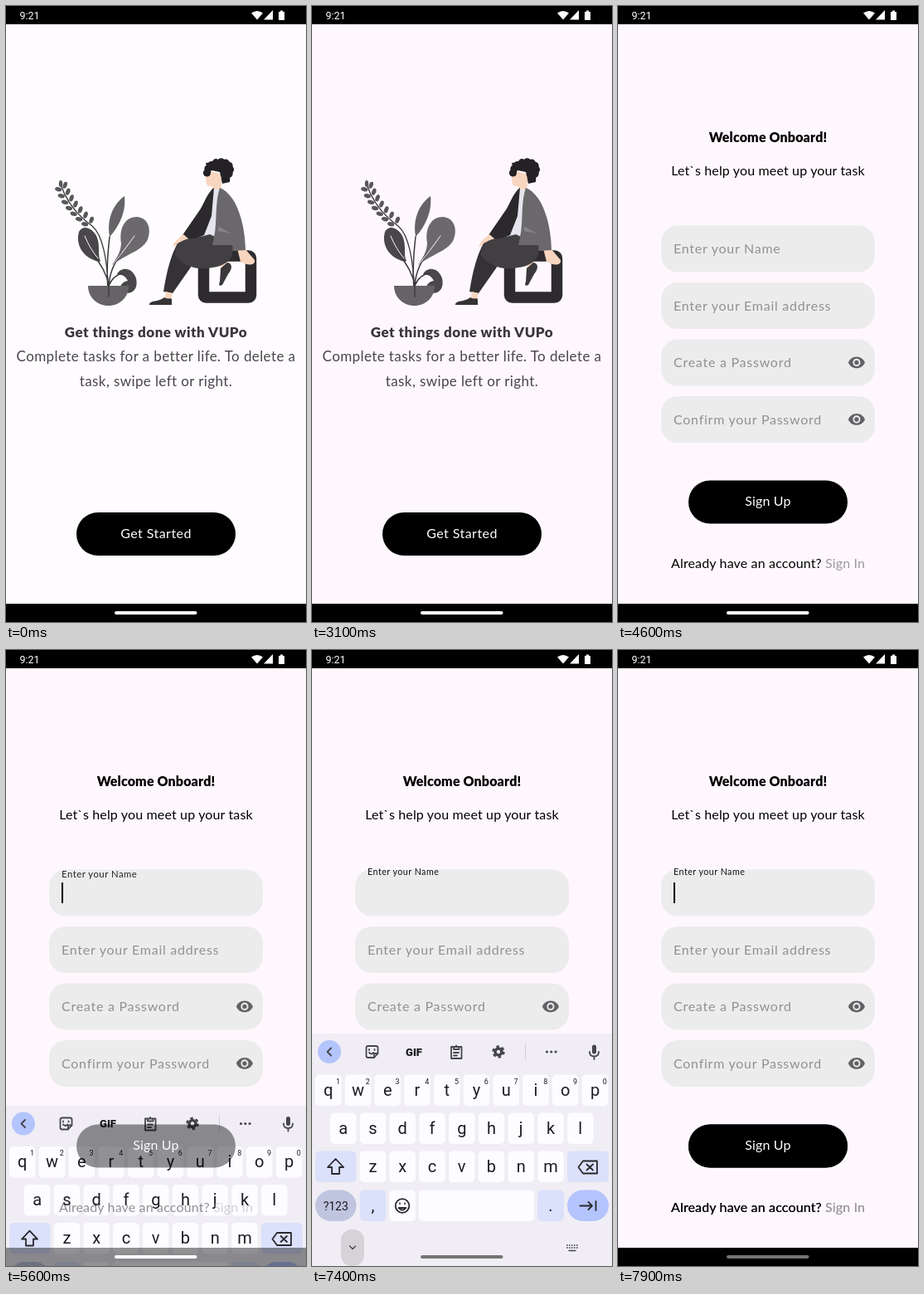
An HTML page that plays this animation: 362 px wide and 742 px high, repeating every 8000 ms.

```html
<!DOCTYPE html>
<html lang="en">
<head>
<meta charset="utf-8">
<title>Task app onboarding</title>
<style>
  html, body { margin: 0; width: 100%; height: 100%; overflow: hidden; background: #fef8fe; }
  svg { display: block; width: 100%; height: 100%; }
  text { font-family: Lato, sans-serif; font-size: 16px; letter-spacing: .15px; }
  .mid { text-anchor: middle; }
  .body { font-size: 17px; letter-spacing: .4px; fill: #49454b; }
  .hint { letter-spacing: .75px; fill: #929093; }
  .heavy { font-weight: 900; }
  .roboto, .keys text { font-family: Roboto, sans-serif; letter-spacing: 0; }
  .keys text { text-anchor: middle; fill: #1d1c21; }
  .line { fill: none; stroke: #46454b; stroke-width: 1.8; stroke-linecap: round; stroke-linejoin: round; }
</style>
</head>
<body>
<svg viewBox="0 0 362 742">
  <defs>
    <path id="eye" fill="#636165" fill-rule="evenodd" transform="scale(.91)" d="M12 4.5C7 4.5 2.73 7.61 1 12c1.73 4.39 6 7.5 11 7.5s9.27-3.11 11-7.5c-1.73-4.39-6-7.5-11-7.5zM12 17c-2.76 0-5-2.24-5-5s2.24-5 5-5 5 2.24 5 5-2.24 5-5 5zm0-8c-1.66 0-3 1.34-3 3s1.34 3 3 3 3-1.34 3-3-1.34-3-3-3z"/>
  </defs>
  <rect id="page" width="362" height="742" fill="#fef8fe"/>

  <g id="welcome">
    <g id="plant">
      <path fill="#656366" d="M125 278C121 256 130 238 143 229C145 246 138 264 125 278Z"/>
      <path fill="#6b696c" d="M128 312C133 303 138 299 139 286C136 267 144 254 158 254C171 255 176 268 171 281C165 295 146 298 128 312Z"/>
      <path fill="#49474a" d="M112 308C91 303 84 286 88 272C93 262 106 268 110 279C114 291 110 300 114 307Z"/>
      <path fill="#49474a" d="M134 323C139 313 153 315 157 328C160 341 152 348 143 345C134 341 139 332 147 331C144 325 139 323 134 323Z"/>
      <path class="line" style="stroke:#3c3a3d;stroke-width:1.3" d="M66 215Q76 245 104 265Q122 280 124 350"/>
      <path class="line" style="stroke:#3c3a3d;stroke-width:1.5" d="M124 350Q120 320 125 278M124 340Q124 318 139 298M124 337Q121 318 104 298M124 337Q130 323 142 322"/>
      <path class="line" style="stroke:#fef8fe;stroke-width:1" d="M130 310Q143 294 155 277M111 304Q101 292 95 277"/>
      <path fill="#656366" d="M99 337H148C148 351 137 361 123.500 361S99 351 99 337Z"/>
      <path class="line" style="stroke:#39373a;stroke-width:1.3" d="M124 350V337"/>
    </g>
    <g id="person">
      <rect x="238.500" y="301" width="57" height="50" rx="3" fill="none" stroke="#2d2b2e" stroke-width="13.500"/>
      <path fill="#f8d5be" d="M260 307L270 309L267 318L259 316Z"/>
      <path fill="#3b393c" d="M267 309C274 310 273 317 268 323L261 336C258 338 256 336 258 332L259 316Z"/>
      <path fill="#f8d5be" d="M279 292L288 292L300 306C301 312 294 312 290 311L283 308Z"/>
      <path fill="#f8d5be" d="M243 198C240 207 241 215 244 217H249L248 224L259 224L261 203Z"/>
      <path fill="#e4e4ec" d="M249 220L260 221L259 285H237Z"/>
      <path fill="#6a686b" d="M258 219C276 226 288 256 289 294L274 295L272 288H249C256 264 251 240 258 219Z"/>
      <path fill="#2b292c" d="M251 219L248 253L239 276L221 284L213 276L235 244C241 233 244 224 251 219Z"/>
      <path fill="#f8d5be" d="M214 275L221 281L210 287L201 290Q202 286 206 282Z"/>
      <path fill="#343235" d="M207 286C222 276 239 288 229 306L201 346L190 344Q196 305 207 286Z"/>
      <path fill="#413f42" d="M204 300C204 287 213 279 227 280L246 275L273 288C277 303 266 313 249 315C230 319 213 313 204 300Z"/>
      <path fill="#6a686b" d="M252 274L273 276V288H249Z"/>
      <path fill="#858386" d="M256 265L271 274L256 271Z"/>
      <path fill="#f8d5be" d="M193 344L201 346L199 354H191Z"/>
      <path fill="#353336" d="M191 351C196 354 199 351 200 353V360H173C173 354 184 357 191 351Z"/>
      <g id="hair" fill="#242225">
        <path d="M241 189L262 187L271 196L270 212L261 214L258 200L243 197Z"/>
      </g>
      <ellipse cx="257" cy="207" rx="2.500" ry="3.500" fill="#f8d5be"/>
    </g>
    <text class="mid body heavy" x="181" y="399" style="letter-spacing:.5px;fill:#3b363d">Get things done with VUPo</text>
    <text class="mid body" x="181" y="428">Complete tasks for a better life. To delete a</text>
    <text class="mid body" x="181" y="458">task, swipe left or right.</text>
    <rect x="85" y="610" width="192" height="52" rx="26"/>
    <text class="mid" x="181" y="641" fill="#fff" style="letter-spacing:.45px">Get Started</text>
  </g>

  <g id="form">
    <rect width="362" height="742" fill="#fef8fe"/>
    <text class="mid heavy" x="181" y="164">Welcome Onboard!</text>
    <text class="mid" x="181" y="204">Let`s help you meet up your task</text>
    <g id="fields"></g>
    <text id="label" class="hint">Enter your Name</text>
    <rect id="cursor" x="67" y="280" width="2" height="25"/>
    <g id="footer">
      <rect x="85" y="571.500" width="192" height="52" rx="26"/>
      <text class="mid" x="181" y="602" fill="#fff">Sign Up</text>
      <text x="64" y="677">Already have an account?</text>
      <text x="250" y="677" fill="#9b999d">Sign In</text>
    </g>
  </g>

  <rect width="362" height="22"/>
  <text class="roboto" x="16.500" y="16" fill="#fff" style="font-size:12.5px">9:21</text>
  <path fill="#fff" d="M296 8.500Q303 3.500 310 8.500L303 16.500ZM322 5V16.500H311ZM329 7H331V5.500H334V7H336V17H329Z"/>
  <rect id="nav" y="720" width="362" height="22"/>

  <g id="keyboard">
    <rect y="462" width="362" height="282" fill="#f0eef4"/>
    <rect id="press" x="35" y="698" width="28" height="44" rx="13" fill="#d5d3d7"/>
    <circle cx="21" cy="484" r="14" fill="#b4c4fc"/>
    <g class="line">
      <path d="M23 479.500L18.500 484L23 488.500"/>
      <path d="M65.500 479Q65.500 477 68 477H77Q79.500 477 79.500 479V486L75 491H68Q65.500 491 65.500 489ZM75 491V486H79.500M69 481V482M75.500 481V482M69 485Q72 488 74 485"/>
      <path d="M168 478H180.500V492H168ZM171 478V481H177.500V478M174 476.500V477M171 485H177M171 488.500H175"/>
      <circle cx="225" cy="484" r="4" style="stroke-width:3.6"/>
      <circle cx="225" cy="484" r="6.500" style="stroke-width:2.4;stroke-linecap:butt" stroke-dasharray="3.4"/>
      <path d="M257.500 474.500V493.500" style="stroke:#d0ced4;stroke-width:1"/>
      <path d="M335 484Q335 489.500 340.500 489.500T346 484M340.500 490V493"/>
      <path d="M340.500 478V484" style="stroke-width:5"/>
      <path d="M283.500 484H295" style="stroke-width:3.2" stroke-dasharray="0 5.300"/>
      <path d="M45.500 718L49 721.500L52.500 718" style="stroke-width:1.4"/>
      <path d="M307 717H321M307 720H321" style="stroke-width:1.5;stroke-linecap:butt" stroke-dasharray="1.700 1.300"/>
      <path d="M310 723.500H318" style="stroke-width:1.3"/>
    </g>
    <g id="keys" class="keys"></g>
    <g class="line" style="stroke:#29282d">
      <path d="M28.500 613L38 623H33V631H24V623H19Z"/>
      <path d="M327 615.500H344V630.500H327L321.500 623ZM331.500 619.500L339 626.500M339 619.500L331.500 626.500"/>
      <circle cx="109" cy="669.500" r="8.300"/>
      <path d="M104.500 672Q109 677 113.500 672ZM106 666.500V667M112 666.500V667"/>
      <path d="M323.500 669.500H338M333.500 665L338 669.500L333.500 674M342.500 664V675"/>
    </g>
  </g>
  <!-- Lower part of the form, lingering over the moving keyboard -->
  <g id="ghost"><use href="#footer"/><use href="#nav"/></g>
  <rect id="pill" x="131" y="729" width="99.500" height="4" rx="2"/>
</svg>

<script>
const $ = id => document.getElementById(id);

function add(parent, tag, attrs, text = "") {
  const node = document.createElementNS("http://www.w3.org/2000/svg", tag);
  for (const name in attrs) node.setAttribute(name, attrs[name]);
  node.textContent = text;
  return parent.appendChild(node);
}

// Curls run over the head and down its back
for (let i = 0; i < 10; i++) {
  const a = Math.PI * (1 + i / 7);
  add($("hair"), "circle", { cx: 256.5 + 14 * Math.cos(a), cy: 199 + 11 * Math.sin(a) - 2 * Math.cos(a), r: 4.6 });
}

// Leaf pairs follow the sprig's curve
const bezier = (a, b, c, u) => a * (1 - u) ** 2 + 2 * b * u * (1 - u) + c * u * u;
for (let i = 0; i < 7; i++) {
  const u = .08 + i * .14, x = bezier(66, 76, 104, u), y = bezier(215, 245, 265, u);
  const leaf = { rx: 4.2, ry: 2.5, fill: "#59575a" };
  add($("plant"), "ellipse", { ...leaf, transform: `translate(${x - 4.5} ${y + 1}) rotate(15)` });
  add($("plant"), "ellipse", { ...leaf, transform: `translate(${x + 3.5} ${y - 4}) rotate(-70)` });
}
add($("plant"), "ellipse", { rx: 2.2, ry: 4, cx: 66, cy: 214, fill: "#59575a" });

["", "Enter your Email address", "Create a Password", "Confirm your Password"].forEach((hint, i) => {
  const y = 264.5 + i * 68.5;
  add($("fields"), "rect", { x: 52, y, width: 258, height: 56, rx: 20, fill: "#ececec" });
  add($("fields"), "text", { x: 67, y: y + 33.5, class: "hint" }, hint);
  if (i > 1) add($("fields"), "use", { href: "#eye", x: 277, y: y + 17 });
});

function key(x, y, width, text = "", fill = "#fdfcff", rx = 5, size = 20) {
  add($("keys"), "rect", { x, y, width, height: 37.5, rx, fill });
  add($("keys"), "text", { x: x + width / 2, y: y + (size < 20 ? 24 : 25), style: `font-size:${size}px` }, text);
}

["qwertyuiop", "asdfghjkl", "zxcvbnm"].forEach((letters, row) => {
  [...letters].forEach((letter, i) => {
    const x = [4, 22, 57.7][row] + i * 35.75;
    key(x, 511.5 + row * 46, 31.5, letter);
    if (!row) add($("keys"), "text", { x: x + 27.5, y: 522.5, style: "font-size:9px" }, (i + 1) % 10);
  });
});
const tint = "#dbe1fa";
key(4, 603.5, 49.5, "", tint);
key(308, 603.5, 50, "", tint);
key(4, 650.5, 49.5, "?123", "#bfc5df", 18.75, 14);
key(57.7, 650.5, 31.5, ",", tint);
key(93.3, 650.5, 31.5);
key(129, 650.5, 139);
key(272, 650.5, 32, ".", tint);
key(308, 650.5, 50, "", "#b4c4fc", 18.75);
add($("keys"), "text", { x: 123, y: 488.5, style: "font-size:13px;font-weight:900" }, "GIF");

const progress = (t, start, length) => Math.min(1, Math.max(0, (t - start) / length));
const easeOut = p => 1 - (1 - p) ** 2;
const mix = (a, b, p) => a + (b - a) * p;
const grey = v => `rgb(${v},${v},${v})`;
const show = (id, on) => $(id).setAttribute("visibility", on ? "visible" : "hidden");
const FOCUS = 5430, CLOSE = 7430;

function draw(t) {
  const warm = progress(t, 0, 900);
  $("page").setAttribute("fill", `rgb(254,${mix(252, 248, warm)},254)`);

  const enter = easeOut(progress(t, 4350, 250)), zoom = mix(.94, 1, enter);
  $("form").setAttribute("opacity", enter);
  $("form").setAttribute("transform", `translate(181 371) scale(${zoom}) translate(-181 -371)`);

  const float = easeOut(progress(t, FOCUS, 260));
  $("label").setAttribute("transform", `translate(67 ${mix(298, 271, float)}) scale(${mix(1, .667, float)})`);
  $("label").style.fill = grey(mix(146, 20, float));
  show("cursor", t >= FOCUS && Math.floor((t - 5480) / 500) % 2 === 0);

  const open = progress(t, FOCUS, 385), close = progress(t, CLOSE, 330);
  $("keyboard").setAttribute("transform", `translate(0 ${280 * (1 - easeOut(open) + easeOut(close))})`);
  show("keyboard", open > 0 && close < 1);
  $("ghost").setAttribute("opacity", 1 - Math.min(1, open * 1.3) * (1 - close));
  show("ghost", open > 0);
  show("press", t >= 7300 && close < 1);
  $("pill").setAttribute("fill", grey(mix(255, 116, progress(t, 5700, 1100))));
}

function tick() {
  draw(performance.now() % 8000);
  requestAnimationFrame(tick);
}
tick();
</script>
</body>
</html>
```
